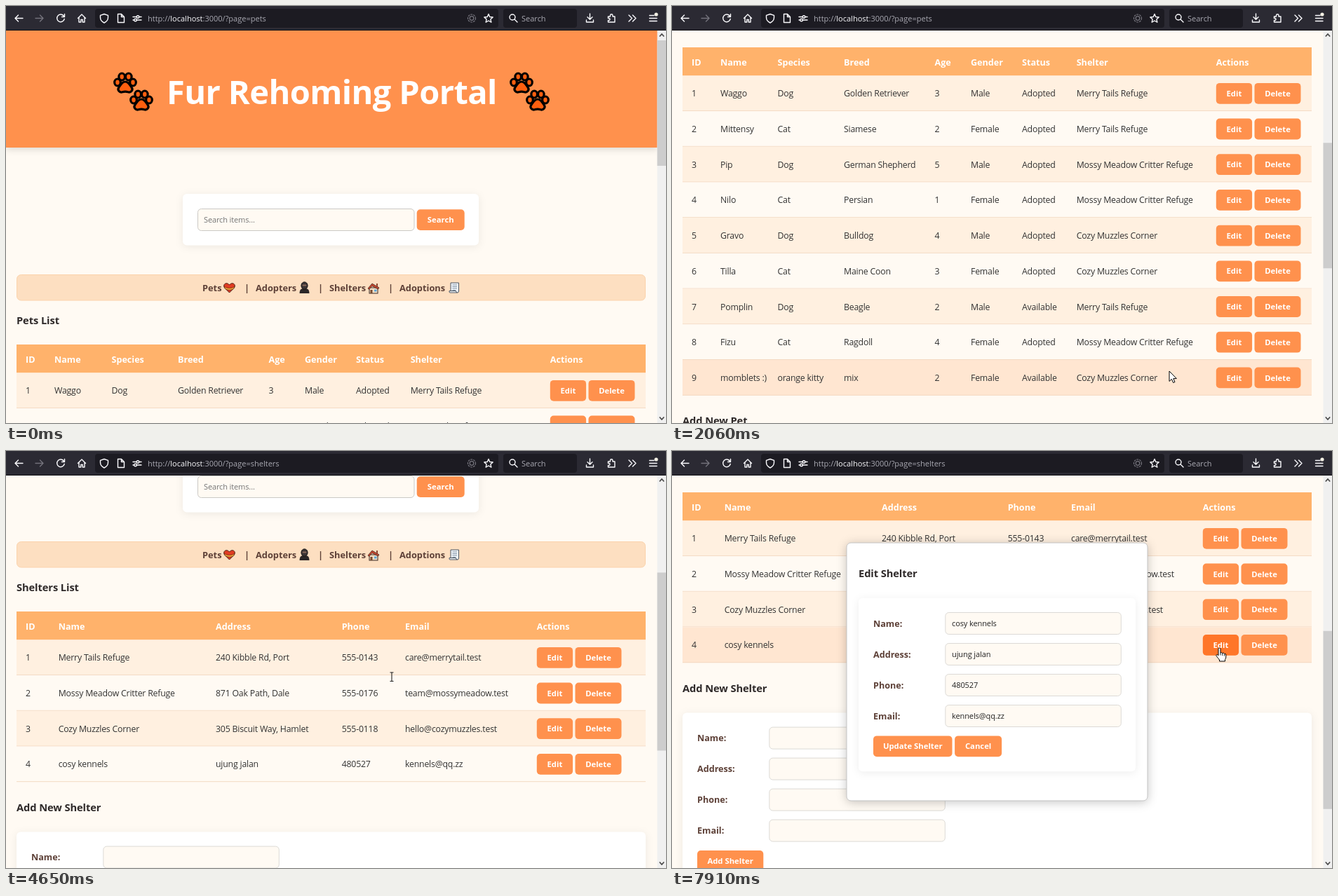
An HTML page for the animation above (8 s loop, 941 by 595 pixels).

```html
<!DOCTYPE html>
<html lang="en">
<head>
<meta charset="utf-8">
<title>Fur Rehoming Portal</title>
<style>
  html, body { margin: 0; width: 100%; height: 100%; overflow: hidden; background: #fffaf3; }
  svg { display: block; width: 941px; height: 595px; font-family: "Open Sans", "Noto Sans", sans-serif; }
  text { white-space: pre; }
  .cell { font-size: 12.3px; letter-spacing: -.2px; fill: #333; }
  .head { font-size: 12.6px; font-weight: 700; fill: #fff; }
  .nav { font-size: 12.8px; font-weight: 700; fill: #5d4037; }
  .label { font-size: 12.6px; font-weight: 700; fill: #5d4037; }
  .h2 { font-size: 14.7px; font-weight: 700; letter-spacing: -.1px; fill: #2f2a2a; }
  .btn { font-size: 11.3px; font-weight: 700; fill: #fff; text-anchor: middle; }
  .hint { font-size: 11px; letter-spacing: -.12px; fill: #757575; }
  .value { font-size: 11px; letter-spacing: -.1px; fill: #222; }
  .title { font-size: 47px; font-weight: 700; letter-spacing: -.6px; fill: #fff; }
  .url { font-size: 11.03px; fill: #a9a9b2; }
  .band { filter: drop-shadow(0 3px 5px rgba(0, 0, 0, .13)); }
  .card { filter: drop-shadow(0 2px 6px rgba(0, 0, 0, .07)); }
  .modal { filter: drop-shadow(0 2px 7px rgba(0, 0, 0, .22)); }
  .icons { fill: none; stroke: #fbfbfe; stroke-width: 1.4; stroke-linecap: round; stroke-linejoin: round; }
</style>
</head>
<body>
<svg id="stage" viewBox="0 0 941 595"></svg>
<script>
const LOOP = 8000, ROW_TOP = 523.4, ROW_H = 50.7;
const ORANGE = '#ff914d', CREAM = '#fffaf3';

// Drawing helpers
const rect = (x, y, w, h, fill, more = '') =>
  `<rect x="${x}" y="${y}" width="${w}" height="${h}" fill="${fill}" ${more}/>`;
const text = (x, y, cls, s) => `<text x="${x}" y="${y}" class="${cls}">${s}</text>`;
const path = (d, more = '') => `<path d="${d}" ${more}/>`;
const group = (x, y, body) => `<g transform="translate(${x} ${y})">${body}</g>`;
const button = (x, y, w, label, id = '') =>
  rect(x, y, w, 29.8, ORANGE, `rx="5" ${id && `id="${id}"`}`) + text(x + w / 2, y + 19, 'btn', label);
const input = (x, y, w) => rect(x, y, w, 31, CREAM, 'rx="5" stroke="#dcdad6"');

function paw(x, y) {
  const toes = [[-11, -1], [-4.8, -9], [4.8, -9], [11, -1]]
    .map(([cx, cy]) => `<ellipse cx="${cx}" cy="${cy}" rx="4.3" ry="5"/>`).join('');
  const pad = path('M0-2C5-2 6.5 3 9 6C12 10 8 14 4 12.8Q0 11.6-4 12.8C-8 14-12 10-9 6C-6.500 3-5-2 0-2Z');
  return group(x, y, `<g fill="#ff5f0f" stroke="#000" stroke-width="3.2">${toes}${pad}</g>`);
}

const heart = path('M0 7L-7 0C-10-5-4-9 0-4C4-9 10-5 7 0Z', 'fill="#e03c22" stroke="#4a1f14"') +
  path('M-7.500-1.500Q0 3 7.500-1.500L6 1.500Q0 5-6 1.500Z', 'fill="#ffb13b" stroke="#4a1f14" stroke-width=".6"');
const hooded = path('M-7 8Q-7 1.500-2.500 1H2.500Q7 1.500 7 8Z', 'fill="#2b2727"') +
  `<ellipse cy="-3" rx="4.6" ry="5.200" fill="#3a3434" stroke="#1c1919"/>` +
  rect(-3, -4.5, 6, 2, '#8a6a5c', 'rx="1"');
const house = rect(-6, -1, 12, 8, '#f6dfc4', 'stroke="#3b2a24"') +
  path('M-8 0L-2-7L8-1L6.500 1L-2-3.500L-6.500 1.500Z', 'fill="#c8452c" stroke="#3b2a24" stroke-width=".8"') +
  rect(-4.5, 2, 3, 5, '#7a4a2c') + rect(1, 1.5, 3.5, 3, '#5ea7d8') + rect(4, -7, 2, 4, '#8f4630');
const sheet = path('M-5-7H6.500V5Q6.500 7 4.500 7H-6Q-7.500 7-7 4.500H-5Z', 'fill="#eef3f8" stroke="#4c5560"') +
  path('M-2.500-4H4M-2.500-1.500H4M-2.500 1H4M-2.500 3.500H2', 'stroke="#8595a8" stroke-width="1"') +
  path('M-7 4.500H2.500Q2.500 7 4.500 7', 'fill="none" stroke="#4c5560"');

// Page parts, laid out for scroll position 0
function pageTop(name) {
  return rect(0, 35, 929, 167, ORANGE, 'class="band"') +
    paw(170, 110) + paw(193, 135) + paw(735, 110) + paw(758, 135) +
    text(229, 139.5, 'title', 'Fur Rehoming Portal') +
    rect(252, 268, 422, 73.5, '#fff', 'rx="6" class="card"') +
    rect(273.5, 289.5, 308.5, 31, CREAM, 'rx="5" stroke="#cbc9c5"') +
    text(282, 309, 'hint', 'Search items...') + button(585.7, 290.2, 68, 'Search') +
    rect(15.5, 383.5, 896, 36.5, '#fddfc1', 'rx="6" stroke="#fbd3ac"') +
    [[280, 'Pets'], [340, '|'], [356, 'Adopters'], [445, '|'], [461, 'Shelters'], [545, '|'], [561, 'Adoptions']]
      .map(([x, s]) => text(x, 407, 'nav', s)).join('') +
    group(318.5, 402, heart) + group(425.5, 402, hooded) + group(524, 403, house) + group(639, 402, sheet) +
    text(15, 453.7, 'h2', name + ' List');
}

function table(key, xs, heads, rows) {
  const last = xs[xs.length - 1];
  let out = rect(15, 483, 897, 40.5, '#ffb26b');
  heads.split('|').forEach((s, i) => out += text(xs[i], 508.5, 'head', s));
  rows.forEach((row, r) => {
    const y = ROW_TOP + r * ROW_H, mid = y + 25.3;
    out += rect(15, y, 897, ROW_H, r % 2 ? CREAM : '#fff0e0') +
      rect(15, y, 897, ROW_H, '#ffe6d1', `opacity="0" class="hover-${key}"`) +
      rect(15, y + ROW_H - 1, 897, 1, '#f3dac3');
    row.split('|').forEach((s, i) => out += text(xs[i], mid + 4.6, 'cell', s));
    out += button(last, mid - 14.8, 51.3, 'Edit', `edit-${key}-${r}`) +
      button(last + 54.7, mid - 14.8, 66, 'Delete');
  });
  return out;
}

function form(x, y, w, h, values, buttons) {
  let out = rect(x, y, w, h, '#fff', 'rx="6" class="card"');
  ['Name', 'Address', 'Phone', 'Email'].forEach((s, i) => {
    const top = y + 20.7 + i * 44;
    out += text(x + 21, top + 20, 'label', s + ':') + input(x + 123.8, top, 250.5) +
      text(x + 133, top + 19.5, 'value', values[i] || '');
  });
  let bx = x + 21;
  for (const [label, bw] of buttons) {
    out += button(bx, y + 196.6, bw, label);
    bx += bw + 3.6;
  }
  return out;
}

const homes = ['Merry Tails Refuge', 'Mossy Meadow Critter Refuge', 'Cozy Muzzles Corner'];
const pets = [
  'Waggo|Dog|Golden Retriever|3|Male|Adopted|0', 'Mittensy|Cat|Siamese|2|Female|Adopted|0',
  'Pip|Dog|German Shepherd|5|Male|Adopted|1', 'Nilo|Cat|Persian|1|Female|Adopted|1',
  'Gravo|Dog|Bulldog|4|Male|Adopted|2', 'Tilla|Cat|Maine Coon|3|Female|Adopted|2',
  'Pomplin|Dog|Beagle|2|Male|Available|0', 'Fizu|Cat|Ragdoll|4|Female|Available|1',
  'momblets :)|orange kitty|mix|2|Female|Available|2'
].map((s, i) => `${i + 1}|${s.slice(0, -1)}${homes[s.slice(-1)]}`)
  .map((s, i) => i === 7 ? s.replace('Available', 'Adopted') : s);
const own = ['cosy kennels', 'ujung jalan', '480527', 'kennels@qq.zz'];
const shelters = [
  `1|${homes[0]}|240 Kibble Rd, Port|555-0143|care@merrytail.test`,
  `2|${homes[1]}|871 Oak Path, Dale|555-0176|team@mossymeadow.test`,
  `3|${homes[2]}|305 Biscuit Way, Hamlet|555-0118|hello@cozymuzzles.test`,
  '4|' + own.join('|')
];
const bottom = n => ROW_TOP + n * ROW_H;

const petsPage = pageTop('Pets') +
  table('pets', [28, 69, 150.5, 245, 374.5, 426, 499, 576.7, 775.8],
    'ID|Name|Species|Breed|Age|Gender|Status|Shelter|Actions', pets) +
  text(15, bottom(9) + 41.5, 'h2', 'Add New Pet');

const sheltersPage = pageTop('Shelters') +
  table('shelters', [28, 74.7, 299, 478.7, 569, 756.8], 'ID|Name|Address|Phone|Email|Actions', shelters) +
  text(15, bottom(4) + 41.5, 'h2', 'Add New Shelter') +
  form(15, bottom(4) + 71.2, 897, 260, [], [['Add Shelter', 94.3]]);

const modal = rect(249, 131, 429, 368, '#fff', 'rx="6" stroke="#c4c4c4" class="modal"') +
  text(266, 180.3, 'h2', 'Edit Shelter') +
  form(266, 209.8, 395, 247.5, own, [['Update Shelter', 112.5], ['Cancel', 67]]);

// Browser frame
const star = Array.from({ length: 10 }, (_, i) => {
  const a = i * Math.PI / 5, r = i % 2 ? 3 : 6.5;
  return `${(688 + r * Math.sin(a)).toFixed(2)},${(18 - r * Math.cos(a)).toFixed(2)}`;
}).join(' ');
const toolbar = rect(0, 0, 941, 35, '#2b2a33') + rect(0, 34, 941, 1, '#0f0f13') +
  rect(127, 4, 575, 27, '#1c1b22', 'rx="4"') + rect(709, 4, 105, 27, '#1c1b22', 'rx="4"') +
  `<text x="202" y="22" class="url">http://<tspan fill="#fbfbfe">localhost</tspan>:3000/?page=<tspan id="query"></tspan></text>` +
  text(735, 22, 'url', 'Search') +
  '<g class="icons">' +
  path('M24 17.500H13M17.500 13L13 17.500L17.500 22') +
  path('M42 17.500H53M48.500 13L53 17.500L48.500 22', 'stroke="#73727b"') +
  path('M82.500 14.500A5.300 5.300 0 1 0 83.200 18.500M83.500 11.500V15.500H79.500') +
  path('M102.500 17.500L108 12L113.500 17.500M104 16.500V23H106.800V19.500H109.200V23H112V16.500') +
  path('M140 11.500L145.500 13.300V16.500C145.500 20 143 22.500 140 24C137 22.500 134.500 20 134.500 16.500V13.300Z') +
  path('M159.500 11.500H164.500L168.500 15.500V23.500H159.500ZM164.500 11.500V15.500H168.500') +
  path('M181 15.500H186M190 15.500H193M181 20H182.500M186.500 20H193') +
  '<circle cx="188" cy="15.500" r="1.800"/><circle cx="184.500" cy="20" r="1.800"/>' +
  '<g stroke="#77767f" stroke-width="1.200"><circle cx="664" cy="17.500" r="5.500" stroke-dasharray="2 2"/><circle cx="664" cy="17.500" r="2.800"/></g>' +
  `<polygon points="${star}"/>` +
  '<circle cx="722" cy="16" r="4"/>' + path('M725 19L729 23') +
  path('M832.500 11V19M829 15.800L832.500 19.300L836 15.800M827.500 20V23H837.500V20') +
  path('M858.500 15H861.500V13.500A1.700 1.700 0 0 1 865 13.500V15H868V23H858.500V20.500H860A1.600 1.600 0 0 0 860 17.500H858.500Z') +
  path('M888 13L892.500 17.500L888 22M893.500 13L898 17.500L893.500 22') +
  path('M917.500 13.500H924M917.500 17.500H928M917.500 21.500H928') +
  '</g><circle cx="927" cy="12" r="2.600" fill="#f3f0e4"/>';

const scrollbar = rect(928.5, 35, 12.5, 560, '#f0f0f0') +
  rect(928.5, 49, 12.5, 179, '#cdcdcd', 'id="thumb"') +
  path('M931.800 43.500L935 40L938.200 43.500M931.800 586.500L935 590L938.200 586.500',
    'fill="none" stroke="#484848" stroke-width="1.700"');

const cursors = `<g id="arrow">${path('M0 0V14.500L3.400 11.400L5.700 16.500L8 15.500L5.800 10.600H10.300Z',
    'fill="#fff" stroke="#000" stroke-width="1"')}</g>` +
  `<g id="ibeam">${path('M-2.500-6H-.5L0-5.500L.5-6H2.500M0-5.500V6M-2.500 6.500H-.5L0 6L.5 6.500H2.500',
    'fill="none" stroke="#222" stroke-width="1.100"')}</g>` +
  `<g id="hand">${path('M-1 1.500A1.500 1.500 0 0 1 2 1.500V7Q3.800 6 4.800 7.500Q6.800 6.700 7.600 8.300Q9.800 7.800 9.800 10V13Q9.800 15 8.500 16.500V19H.5V17Q-1.500 14.500-3.800 11.500C-4.800 10-3-8.900-3-8.900'.replace('C-4.800 10-3-8.900-3-8.900', 'C-4.800 10-2.800 8.500-1 10.800Z'),
    'fill="#fff" stroke="#000" stroke-width="1" stroke-linejoin="round"')}${path('M2 7V10.500M4.800 8V11M7.600 9V11.500', 'stroke="#000" stroke-width=".9"')}</g>`;

const stage = document.getElementById('stage');
stage.innerHTML = rect(0, 0, 941, 595, CREAM) +
  `<g id="pets">${petsPage}</g><g id="shelters">${sheltersPage}</g>` +
  `<g id="modal">${modal}</g>${scrollbar}${toolbar}<g id="cursor">${cursors}</g>`;

const el = id => document.getElementById(id);
const show = (node, on) => node.setAttribute('display', on ? 'inline' : 'none');
const ease = p => p * p * (3 - 2 * p);

// Value lists of [time, ...numbers], eased between entries
function track(keys, t) {
  if (t <= keys[0][0]) return keys[0].slice(1);
  for (let i = 1; i < keys.length; i++) {
    const a = keys[i - 1], b = keys[i];
    if (t < b[0]) {
      const p = ease((t - a[0]) / (b[0] - a[0]));
      return a.slice(1).map((v, k) => v + (b[k + 1] - v) * p);
    }
  }
  return keys[keys.length - 1].slice(1);
}

const SWITCH = 4020, CLICK = 7400;
const petsScroll = [[170, 0], [670, 254], [795, 254], [945, 424], [2880, 424], [3190, 254]];
const sheltersScroll = [[4360, 0], [4640, 254], [4705, 254], [4930, 424]];
const mouse = [
  [950, 829, 295], [1320, 822, 130], [1420, 812, 118], [1780, 722, 506], [2060, 709, 521],
  [2880, 709, 521], [3200, 577, 428], [3290, 577, 428], [3850, 488, 146], [4200, 488, 146],
  [4640, 550, 322], [5430, 550, 322], [5720, 234.5, 279], [6210, 262, 284], [6500, 420, 298],
  [6800, 640, 236], [7180, 780, 281]
];
const scrollAt = t => track(t < SWITCH ? petsScroll : sheltersScroll, t)[0];
const hoverLive = t => (t > 980 && t < 2890) || (t > 3300 && t < SWITCH) || t > 5440;

function rowAt(t) {
  if (!hoverLive(t)) return -1;
  const y = track(mouse, t)[1] + scrollAt(t);
  return Math.floor((y - ROW_TOP) / ROW_H);
}

function pointerAt(t) {
  if ((t > 3780 && t < SWITCH) || t > 7100) return 'hand';
  return t >= SWITCH && t < 5500 ? 'ibeam' : 'arrow';
}

function draw(t) {
  const key = t < SWITCH ? 'pets' : 'shelters';
  const scroll = Math.round(scrollAt(t));
  for (const id of ['pets', 'shelters']) show(el(id), id === key);
  el(key).setAttribute('transform', `translate(0 ${-scroll})`);
  el('query').textContent = key;
  el('thumb').setAttribute('y', 49 + scroll * (key === 'pets' ? .345 : .49));
  el('thumb').setAttribute('height', key === 'pets' ? 179 : 254);

  // Row tint follows the pointer with a 250 ms fade
  const recent = Array.from({ length: 10 }, (_, k) => rowAt(t - k * 25));
  document.querySelectorAll('.hover-' + key).forEach((node, r) =>
    node.setAttribute('opacity', recent.filter(v => v === r).length / 10));
  el('edit-shelters-3').setAttribute('fill', t > 7110 ? '#ff7629' : ORANGE);
  show(el('modal'), t >= CLICK);

  const [x, y] = track(mouse, t), pointer = pointerAt(t);
  show(el('cursor'), t >= 600);
  el('cursor').setAttribute('transform', `translate(${x.toFixed(1)} ${y.toFixed(1)})`);
  for (const id of ['arrow', 'ibeam', 'hand']) show(el(id), id === pointer);
}

const start = performance.now();
function tick() {
  draw((performance.now() - start) % LOOP);
  requestAnimationFrame(tick);
}
tick();
</script>
</body>
</html>
```
